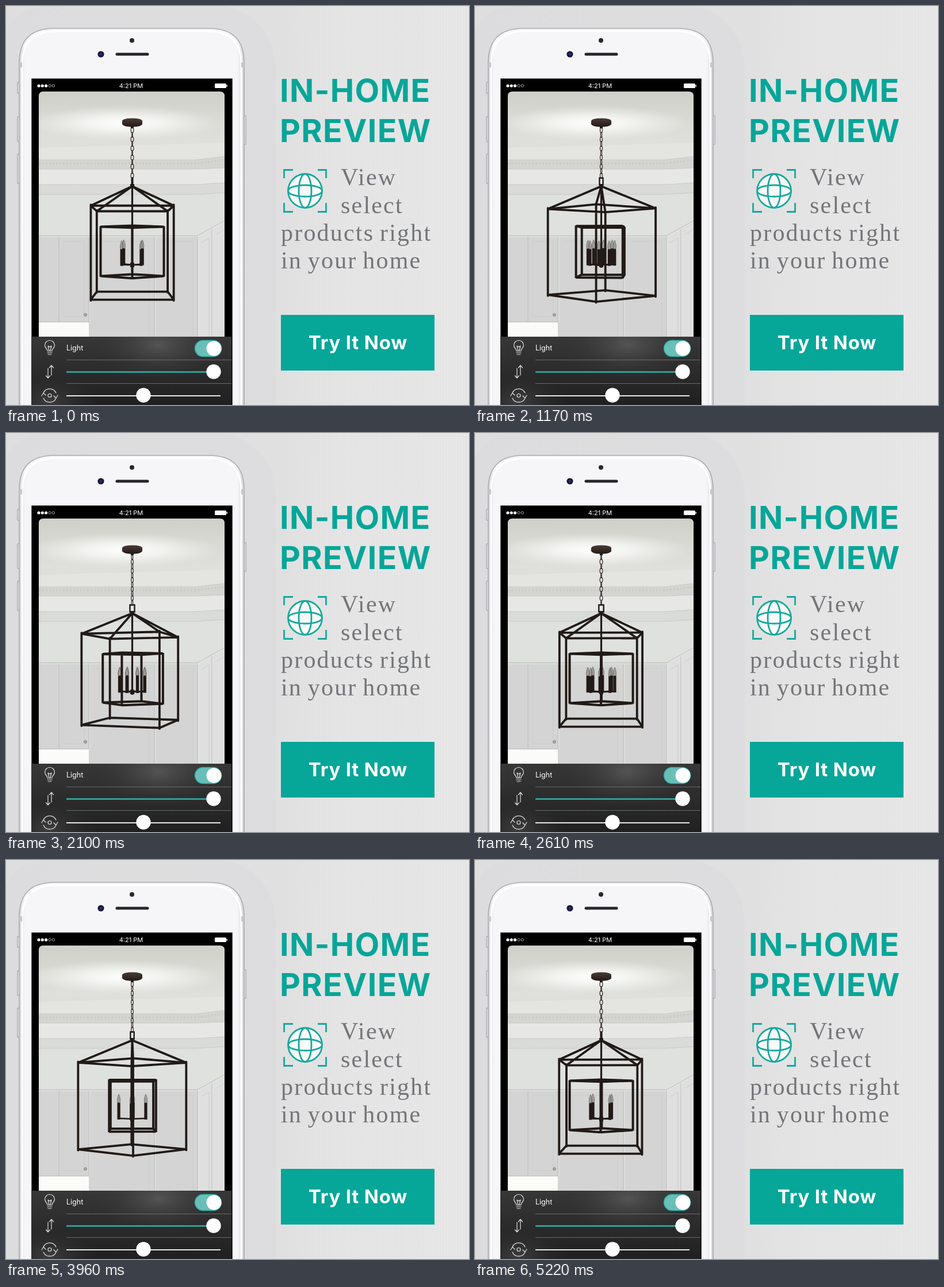
These frames come from a looping animation (805 px wide and 695 px high, 5250 ms). An HTML page:

```html
<!DOCTYPE html>
<html lang="en">
<head>
<meta charset="utf-8">
<title>In-home preview</title>
<style>
  html, body { margin: 0; width: 100%; height: 100%; overflow: hidden; background: #e2e2e3; }
  svg { display: block; width: 805px; height: 695px; }
  .bold { font-family: Inter, "Open Sans", sans-serif; font-weight: 700; }
  .slab { font: 42px "Liberation Serif", "Noto Serif", serif; letter-spacing: 2.2px; word-spacing: -3px; fill: #747579; }
  .ui { font-family: Inter, Roboto, sans-serif; fill: #fff; }
  .line { fill: none; }
</style>
</head>
<body>
<svg viewBox="0 0 805 695">
  <defs>
    <linearGradient id="back">
      <stop offset="0" stop-color="#dededf"/><stop offset=".6" stop-color="#e0e0e1"/>
      <stop offset=".72" stop-color="#e5e5e5"/><stop offset="1" stop-color="#e7e7e7"/>
    </linearGradient>
    <pattern id="stripes" width="5" height="5" patternUnits="userSpaceOnUse">
      <path d="M.5 0V5" stroke="#dcdcdd" opacity=".35"/>
    </pattern>
    <linearGradient id="body">
      <stop offset="0" stop-color="#d4d5d8"/><stop offset=".025" stop-color="#f6f6f8"/>
      <stop offset=".97" stop-color="#f6f6f8"/><stop offset="1" stop-color="#d4d5d8"/>
    </linearGradient>
    <linearGradient id="wall" x2="0" y2="1">
      <stop offset="0" stop-color="#cfcfc9"/><stop offset=".1" stop-color="#d9d9d4"/>
      <stop offset=".2" stop-color="#dfdfdb"/><stop offset=".3" stop-color="#d9dad6"/>
      <stop offset=".45" stop-color="#dadcd9"/><stop offset="1" stop-color="#d5d6d5"/>
    </linearGradient>
    <radialGradient id="glow">
      <stop offset="0" stop-color="#fff"/><stop offset=".4" stop-color="#f8f8f6" stop-opacity=".8"/>
      <stop offset="1" stop-color="#f0f0ec" stop-opacity="0"/>
    </radialGradient>
    <radialGradient id="sheen">
      <stop offset="0" stop-color="#626262"/><stop offset="1" stop-color="#303030" stop-opacity="0"/>
    </radialGradient>
    <linearGradient id="panel" x2="0" y2="1">
      <stop offset="0" stop-color="#373737"/><stop offset="1" stop-color="#202020"/>
    </linearGradient>
    <linearGradient id="canopy" x2="0" y2="1">
      <stop offset="0" stop-color="#4a3c35"/><stop offset="1" stop-color="#1d1512"/>
    </linearGradient>
    <clipPath id="photo"><path d="M57 576V157q0-8 8-8H372q8 0 8 8V576z"/></clipPath>
    <clipPath id="controls"><path d="M44 576H392V695H44z"/></clipPath>
  </defs>

  <path fill="url(#back)" d="M0 0H805V695H0z"/>
  <path fill="#dcdcde" opacity=".5" d="M0 45Q15 8 60 0H380Q465 20 469 110V695H0z"/>
  <path fill="url(#stripes)" d="M526 0H805V695H545V120Q545 50 520 0z"/>

  <!-- phone -->
  <g fill="#e6e6e9" stroke="#96979c">
    <path d="M23 133H20V152H23M23 193H20V236H23M23 258H20V309H23M413 191H417V241H413"/>
    <path fill="url(#body)" stroke="#a9abb0" stroke-width="1.6"
      d="M23 700V99Q23 39 84 39H353Q414 39 414 99V700z"/>
    <path class="line" stroke="#fff" stroke-width="3" d="M28 700V101Q28 44 86 44H351Q409 44 409 101V700"/>
  </g>
  <path fill="#c6c7ca" d="M23 98h5v9h-5zM409 98h5v9h-5z"/>
  <circle cx="219" cy="60" r="4" fill="#29272c"/>
  <circle cx="165" cy="84" r="5.6" fill="#17183a"/><circle cx="165" cy="84" r="2.2" fill="#26307a"/>
  <path stroke="#28252a" stroke-width="5" stroke-linecap="round" d="M193 84H246"/>
  <path stroke="#55565a" d="M44.5 126.5H393.5V700H44.5z"/>

  <g fill="#fff">
    <circle cx="57" cy="139" r="2.6"/><circle cx="63.3" cy="139" r="2.6"/><circle cx="69.6" cy="139" r="2.6"/>
    <g class="line" stroke="#ccc" stroke-width=".8"><circle cx="76" cy="139" r="2.2"/><circle cx="82.3" cy="139" r="2.2"/></g>
    <rect x="363" y="135" width="20" height="8" rx="1.5"/><path d="M383.5 137.5h1.5v3h-1.5z"/>
  </g>
  <text class="ui" x="217.5" y="143" font-size="11" text-anchor="middle">4:21 PM</text>

  <!-- room -->
  <g clip-path="url(#photo)">
    <path fill="url(#wall)" d="M57 149H380V576H57z"/>
    <ellipse cx="205" cy="204" rx="170" ry="30" fill="url(#glow)"/>
    <path fill="#e4e5e1" d="M57 247L380 238V262L330 268H57z"/>
    <path fill="#d2d3ce" opacity=".6" d="M57 268H330L380 262V283L330 284H57z"/>
    <path class="line" stroke="#bfc0ba" stroke-width="4" stroke-dasharray="3 3" opacity=".4" d="M57 274H330L380 268"/>
    <path fill="#e7e8e5" d="M57 284H330L380 282V308L330 311H57z"/>
    <path class="line" stroke="#c9cac6" d="M57 268H330L380 262M57 284H330L380 282M57 311H330L380 308M57 328H330L380 325"/>
    <path fill="#dfe1de" d="M57 329H330L380 326V375L333 400H57z"/>
    <path fill="#d3d4d3" d="M57 400H333V576H57z"/>
    <path fill="#dedfde" d="M333 400L380 374V576H333z"/>
    <path class="line" stroke="#bcbebd" d="M57 400H333L380 374M144 400V551M258 400V576M333 400V576M358 388V576M92 400V551"/>
    <path class="line" stroke="#e6e7e6" d="M57 402H333L380 376M146 402V551M260 402V576M335 402V576M360 389V576"/>
    <path class="line" stroke="#cbcdcc" d="M100 410H136V541H100zM155 410H248V576M270 410H325V576M340 412L353 404V576M365 398L380 389"/>
    <path fill="#fbfbfa" d="M57 551H144V576H57z"/>
    <path stroke="#bbb" d="M57 550.5H144"/>
    <circle cx="138" cy="538" r="2.5" fill="#a5a6a6" stroke="#777" stroke-width=".7"/>
  </g>

  <!-- pendant -->
  <path id="chain" class="line" stroke="#3a322e" stroke-width="1.3"/>
  <path fill="url(#canopy)" d="M202 200Q204 195.5 219.5 195.5Q235 195.5 237 200V206Q234 210.500 219.5 210.500Q205 210.500 202 206zM217 209h5v4h-5z"/>
  <path id="ring" class="line" stroke="#211a17" stroke-width="2.4"/>
  <path id="bulbs" fill="#777672" fill-opacity=".55" stroke="#6a6763" stroke-width=".8"/>
  <g class="line" stroke="#211a17" stroke-linejoin="round">
    <path id="arms" stroke-width="2.5"/>
    <path id="candles" stroke-width="5.2"/>
    <path id="inner" stroke-width="4"/>
    <path id="outer" stroke-width="3.8" stroke-linecap="round"/>
    <path stroke-width="3.2" d="M219.5 312V456"/>
    <path stroke-width="7" d="M219.5 447V455M219.5 310V317"/>
  </g>

  <!-- controls -->
  <g clip-path="url(#controls)">
    <path fill="url(#panel)" d="M44 576H392V695H44z"/>
    <ellipse cx="265" cy="590" rx="120" ry="65" fill="url(#sheen)" opacity=".7"/>
    <ellipse cx="75" cy="690" rx="90" ry="50" fill="url(#sheen)" opacity=".45"/>
    <path stroke="#6a6a6a" d="M105 616.5H392M105 657.5H392"/>
    <text class="ui" x="105" y="600" font-size="12.5">Light</text>
    <rect x="328.5" y="582.5" width="46" height="28" rx="14" fill="#69bfb7" stroke="#30aaa0" stroke-width="1.5"/>
    <path stroke="#30b0a6" stroke-width="2.4" d="M105 637.5H350"/>
    <path stroke="#e8e8e8" stroke-width="2" d="M105 679H373"/>
    <g fill="#fff"><circle cx="361.5" cy="596.5" r="13"/><circle cx="361" cy="637" r="12.7"/><circle cx="239" cy="678" r="12.7"/></g>
    <g class="line" stroke="#e2e2e2" stroke-width="1.2" stroke-linecap="round" stroke-linejoin="round">
      <path d="M72 601C72 596 67.5 596 67.5 591A8.5 8.5 0 0 1 84.5 591C84.5 596 80 596 80 601zM72 604H80M73 607H79M75 601L73 592L76 594L79 592L77 601"/>
      <path d="M73 648V631M69.5 644L73 648L76.5 644M79 643V626M75.5 630L79 626L82.5 630"/>
      <path d="M65 674A12 12 0 0 1 87 674M87 683A12 12 0 0 1 65 683M62 679L65 674L69 678M83 679L87 683L90 678"/>
      <circle cx="76" cy="678.5" r="3"/>
    </g>
  </g>

  <!-- message -->
  <g class="bold" font-size="55.5" letter-spacing="1.3" fill="#06a699">
    <text x="476" y="167">IN-HOME</text>
    <text x="476" y="237">PREVIEW</text>
  </g>
  <g class="line" stroke="#16a99c" stroke-width="2.8">
    <path d="M483.5 300V285.5H499M542 285.5H556.5V300M556.5 343V358.5H542M499 358.5H483.5V343"/>
    <circle cx="520" cy="322" r="29.5" fill="#fafafa"/>
    <ellipse cx="520" cy="322" rx="29.5" ry="10"/>
    <ellipse cx="520" cy="322" rx="11" ry="29.5"/>
  </g>
  <g class="slab">
    <text x="582" y="312">View</text>
    <text x="582" y="361">select</text>
    <text x="478" y="409">products right</text>
    <text x="478" y="457">in your home</text>
  </g>
  <path fill="#06a699" d="M478 538H745V635H478z"/>
  <text class="bold" x="612" y="598" font-size="33" letter-spacing=".8" fill="#fff" text-anchor="middle">Try It Now</text>
</svg>
<script>
  const LOOP = 5250, CX = 219.5, HORIZON = 415, DEPTH = 850, TOP = -62;
  const rad = deg => deg * Math.PI / 180;
  const draw = (id, d) => document.getElementById(id).setAttribute('d', d);

  // Perspective view of a point on a circle around the hanging axis.
  function point(radius, deg, height, drop = 0) {
    const scale = DEPTH / (DEPTH - radius * Math.cos(rad(deg)));
    return [CX + radius * Math.sin(rad(deg)) * scale, HORIZON + height * scale + drop];
  }
  const line = (...points) => 'M' + points.map(p => p.map(v => v.toFixed(2)).join(' ')).join('L');
  const around = count => Array.from({ length: count }, (_, i) => i * 360 / count);

  function cage(radius, turn, top, bottom, foot) {
    return around(4).map(step => {
      const a = turn + step, b = a + 90;
      return line(point(radius, a, top), point(radius, b, top)) +
        line(point(radius, a, bottom), point(radius, b, bottom)) +
        line(point(radius, a, top, -foot), point(radius, a, bottom, foot));
    }).join('');
  }

  function drawChain(turn) {
    const wide = 0.7 + 1.7 * Math.abs(Math.cos(rad(turn))), thin = 3.1 - wide;
    let d = '';
    for (let i = 0; i < 11; i++) {
      const w = i % 2 ? thin : wide;
      d += `M${CX} ${212 + i * 7.9}a${w} 4.5 0 0 1 0 9a${w} 4.5 0 0 1 0 -9`;
    }
    draw('chain', d);
  }

  function drawCandles(turn, count) {
    let arms = '', candles = '', bulbs = '';
    for (const step of around(count)) {
      const foot = point(23.5, turn + 40 + step, 35), [x, y] = foot;
      arms += line([CX, 451], foot);
      candles += line([x, y - 27], [x, y + 2]);
      bulbs += `M${x} ${y - 42}q4 9 2 15h-4q-2 -6 2 -15`;
    }
    draw('arms', arms);
    draw('candles', candles);
    draw('bulbs', bulbs);
  }

  function frame(now) {
    const t = now % LOOP, turn = 180 * t / LOOP;
    const roof = around(4).map(a => line([CX, 314], point(94, turn + 45 + a, TOP))).join('');
    draw('outer', cage(94, turn + 45, TOP, 89, 1.5) + roof);
    draw('inner', cage(55, turn, -30.5, 55.5, 1));
    const w = 0.8 + 3.4 * Math.abs(Math.sin(rad(turn)));
    draw('ring', `M${CX - w} 299.5h${2 * w}v12h${-2 * w}z`);
    drawChain(turn);
    drawCandles(turn, t > 600 && t < 3600 ? 8 : 4);
    requestAnimationFrame(frame);
  }
  requestAnimationFrame(frame);
</script>
</body>
</html>
```
